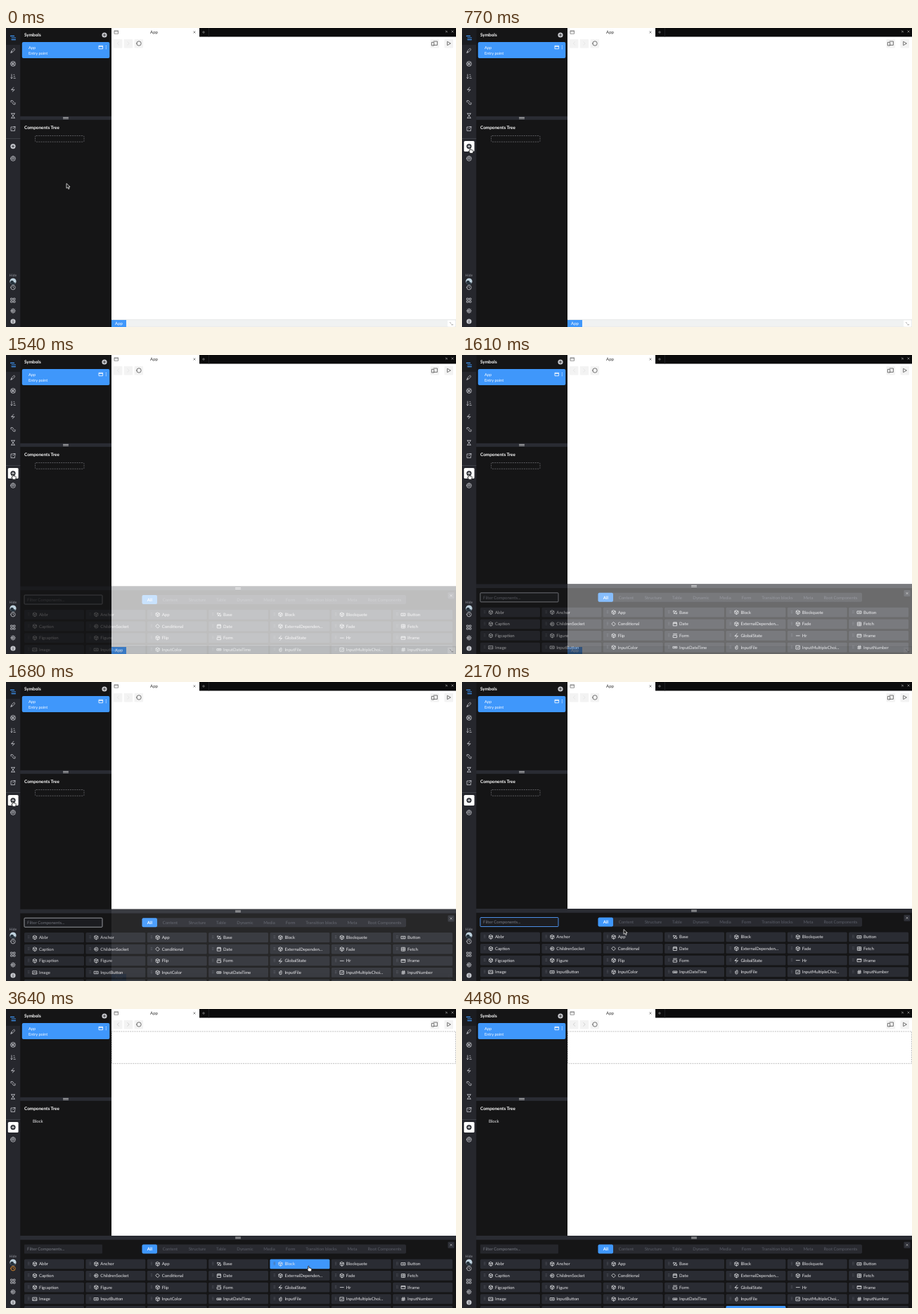
Animation of 640x426 px, one loop 4.55 s. Source, as an HTML page:

```html
<!DOCTYPE html>
<html lang="en">
<head>
<meta charset="utf-8">
<title>Component builder</title>
<style>
  html, body { margin: 0; width: 100%; height: 100%; overflow: hidden; background: #fff; }
  svg { display: block; width: 640px; height: 426px; }
  text { font-family: Lato, sans-serif; font-size: 6.05px; fill: #e9e9ec; text-rendering: geometricPrecision; white-space: pre; }
  .icon { fill: none; stroke: #c4c6cc; stroke-width: .8; stroke-linecap: round; stroke-linejoin: round; }
</style>
</head>
<body>
<svg id="stage" viewBox="0 0 640 426"></svg>
<script>
const LOOP = 4550, STEP = 70;
const BLUE = '#3f97fb', PANEL = '#151516', BAR = '#2a2c33';
const stage = document.getElementById('stage');

function add(parent, tag, attrs = {}, content = '') {
  const el = document.createElementNS('http://www.w3.org/2000/svg', tag);
  for (const key in attrs) el.setAttribute(key, attrs[key]);
  el.textContent = content;
  return parent.appendChild(el);
}
const group = (parent = stage) => add(parent, 'g');
const rect = (parent, x, y, width, height, fill, rx = 0, extra = {}) =>
  add(parent, 'rect', { x, y, width, height, fill, rx, ...extra });
const label = (parent, x, y, content, extra = {}) => add(parent, 'text', { x, y, ...extra }, content);
const icon = (parent, x, y, d, extra = {}) =>
  add(parent, 'path', { class: 'icon', d, transform: `translate(${x} ${y})`, ...extra });
const tint = (color, more = '') => ({ style: `stroke:${color};${more}` });
const show = (el, on) => el.setAttribute('visibility', on ? 'visible' : 'hidden');
const circle = r => `M${-r} 0a${r} ${r} 0 1 1 ${2 * r} 0a${r} ${r} 0 1 1 ${-2 * r} 0z`;

const PLUS = 'M-1.6 0h3.2M0-1.6v3.2';
const CROSS = 'M-1.2-1.2l2.4 2.4M1.2-1.2l-2.4 2.4';
const WINDOW = 'M-2.6-2.2h5.2v4.4h-5.2zM-2.6-1h5.2';
const BOLT = 'M.8-3l-3 3.4h4.4l-3 2.8M-2.2.4l1.8-.1';
const SHAPES = {
  cube: 'M0-2.8l2.5 1.3v2.9L0 2.8l-2.5-1.4v-2.9zM-2.5-1.5L0-.2l2.5-1.3M0-.2v3',
  socket: circle(2.6) + circle(.9),
  diamond: 'M0-2.7L2.7 0 0 2.7-2.7 0z',
  swap: 'M-2.4-.3v-2l4 1.4M2.4.3v2l-4-1.4M-1.5 2l3-4',
  button: 'M-2.8-1.7h5.6v3.4h-5.6zM-1 0h2',
  date: 'M-2.4-2.1h4.8v4.6h-4.8zM-2.4-.7h4.8M-1.2-2.9v1M1.2-2.9v1',
  grid: 'M-2.4-2.4h4.8v4.8h-4.8zM-2.4 0h4.8M0-2.4v4.8',
  form: 'M-2.5-2.5h5M-2.5-.6h5v3.1h-5z',
  bolt: BOLT,
  line: 'M-2.5 0h5',
  frame: 'M-2.7-2h5.4v4h-5.4zM-2.7-.9h5.4',
  image: 'M-2.8-2.2h5.6v4.4h-5.6zM-2.8 1.4l2-2 1.3 1.2 1-.8 1.3 1.4',
  field: 'M-2.8-1.2h5.6v2.4h-5.6zM-1.2 0h2.4',
  clip: 'M-1.6-1v2.4a1.6 1.4 0 0 0 3.2 0v-3a1 1 0 0 0-2 0v2.6',
  check: 'M-2.5-2.5h5v5h-5zM-1.2 0l1 1 1.6-2',
  hash: 'M-2.4-1h4.8M-2.4 1h4.8M-.6-2.5l-.8 5M1.4-2.5l-.8 5'
};

// Page area
const page = group();
rect(page, 150, 0, 490, 12.5, '#0b0b0c');
rect(page, 150, 0, 125, 13, '#fff');
rect(page, 288, 0, .7, 12.5, '#26272b');
icon(page, 157, 6, WINDOW, tint('#777'));
label(page, 210.5, 8, 'App', { 'text-anchor': 'middle', style: 'fill:#333' });
icon(page, 268, 6, CROSS, tint('#777'));
icon(page, 281, 6, PLUS, tint('#888', 'stroke-width:.7'));
icon(page, 626.5, 5, 'M-1.3-1l2.6 2M-.8 1.2l1.4-2', tint('#888'));
icon(page, 635, 5, CROSS, tint('#888'));
for (const x of [153, 167.7, 182.6, 603.5, 623.5]) rect(page, x, 16, 12.5, 12.5, '#f3f3f3', 1);
const arrows = [icon(page, 159.5, 22, 'M1.2-2.4L-1.2 0l2.4 2.4'), icon(page, 174, 22, 'M-1.2-2.4L1.2 0l-2.4 2.4')];
icon(page, 189, 22, circle(3.2), tint('#555'));
icon(page, 609.7, 22, 'M-4-1.6h3v4.6h-3zM-1.5-3h5.2v5.4h-5.2', tint('#555'));
icon(page, 630, 22, 'M-2-2.5L2.4 0-2 2.5z', tint('#555'));
rect(page, 150, 415.5, 490, 10.5, '#f0f2f2', 0, { stroke: '#dcdede', 'stroke-width': .5 });
rect(page, 150, 416, 21, 10, BLUE);
label(page, 160.5, 423.3, 'App', { 'text-anchor': 'middle', style: 'fill:#fff' });
rect(page, 628, 416.5, 11, 9, '#fff', 1);
icon(page, 633.5, 421, 'M-2-1.5L-.6 0M.2 1.8h2', tint('#777', 'stroke-width:.7'));
const dashed = { 'stroke-width': .7, 'stroke-dasharray': '2 1.2' };
const pageBlock = rect(page, 150.5, 32, 489, 45.7, 'none', 0, { stroke: '#a4a4a4', ...dashed });

// Symbols and tree column
const column = group();
const heading = { style: 'font-weight:700;font-size:6.4px;fill:#fff' };
rect(column, 20, 0, 130, 426, PANEL);
label(column, 26, 12.1, 'Symbols', heading);
add(column, 'circle', { cx: 140, cy: 10, r: 3.6, fill: '#c9cacf' });
icon(column, 140, 10, PLUS, tint('#222'));
rect(column, 22.8, 20, 124.5, 23, BLUE, 2);
label(column, 32, 30, 'App', { style: 'font-size:5.6px;fill:#fff' });
label(column, 32, 38.4, 'Entry point', { style: 'font-size:5.6px;fill:#fff' });
icon(column, 135, 27.5, WINDOW, tint('#fff'));
icon(column, 142.3, 27.5, 'M0-2v0M0 0v0M0 2v0', tint('#fff', 'stroke-width:1.2'));
rect(column, 20, 125.8, 130, 5, BAR);
icon(column, 85, 128.3, 'M-3.5-.9h7M-3.5.9h7', tint('#ddd'));
label(column, 26, 144.4, 'Components Tree', heading);
const dropBox = rect(column, 41.5, 153.5, 69.5, 8.7, 'none', 1.5, { stroke: '#77787c', ...dashed });
const treeBlock = label(column, 38, 162.2, 'Block');

// Components panel
const panel = group();
rect(panel, 20, 323, 620, 120, PANEL);
rect(panel, 20, 323, 620, 5.8, BAR);
icon(panel, 330, 326, 'M-3.5-.9h7M-3.5.9h7', tint('#ddd'));
rect(panel, 628.5, 331.7, 9, 9, '#2f3138', 1);
icon(panel, 633, 336.2, CROSS, tint('#bbb', 'stroke-width:.7'));
const filter = rect(panel, 26, 335.5, 111, 13, '#25262b', 1);
label(panel, 30, 344.2, 'Filter Components...', { style: 'fill:#777a83' });
rect(panel, 193.5, 335.5, 375.5, 13, '#292a30', 2);
rect(panel, 193.5, 335.5, 21.5, 13, BLUE, 2);
const tabs = { All: 204.3, Content: 233.5, Structure: 272, Table: 306, Dynamic: 340, Media: 374.5,
  Form: 404.7, 'Transition blocks': 448.5, Meta: 492.5, 'Root Components': 538.5 };
for (const name in tabs) {
  label(panel, tabs[name], 344.2, name,
    { 'text-anchor': 'middle', style: name === 'All' ? 'fill:#fff;font-weight:700' : 'fill:#595c66' });
}

const components = [
  'Abbr Anchor App Base:swap Block Blockquote Button:button',
  'Caption ChildrenSocket:socket Conditional:diamond Date:date ExternalDependen... Fade Fetch:grid',
  'Figcaption Figure Flip Form:form GlobalState:bolt Hr:line Iframe:frame',
  'Image:image InputButton:button InputColor InputDateTime:field InputFile:clip InputMultipleChoi...:check InputNumber:hash',
  '* * * * * * *'
];
const cells = components.flatMap((row, r) => row.split(' ').map((entry, c) => {
  const [name, shape = 'cube'] = entry.split(':');
  const x = 26 + 87.35 * c, y = 356.4 + 16.65 * r, middle = y + 6.9;
  const box = rect(panel, x, y, 85, 13.8, BAR, 1.5);
  if (name !== '*') {
    icon(panel, x + 6.3, middle, 'M-.7-2.4v4.8M.7-2.4v4.8', tint('#5c5f68', 'stroke-dasharray:.1 1.55'));
    icon(panel, x + 15, middle, SHAPES[shape], tint('#e4e5e8'));
    label(panel, x + 21, middle + 2.1, name);
  }
  return { box, x, y };
}));

// Sidebar
const side = group();
rect(side, 0, 0, 20.3, 426, '#26272d');
rect(side, 0, 0, 20.3, 24, '#1b1c20');
rect(side, 0, 157, 20.3, .8, '#44464e');
icon(side, 10, 14, 'M-3.5-2.6h5M-2 0h5.5M-2 2.6h5.5', tint(BLUE, 'stroke-width:1.2'));
const tools = [
  [32, 'M-3 3l.8-2.4L1.4-3 3-1.4-.6 2.2zM-3 3l1.6-1.6'],
  [51, circle(3.5) + circle(1.3) + 'M-2.5-2.5l1.6 1.6M2.5-2.5L.9-.9M-2.5 2.5l1.6-1.6M2.5 2.5L.9.9'],
  [69, 'M-2-3v6l-1.2-1.2M-2 3l1.2-1.2M1-2.6h.8M1 0h1.6M1 2.6h2.4'],
  [87.5, BOLT],
  [106, 'M-3-.4v-2.2h2.4l2 2.8M3 .4v2.4H.6l-2-2.8'],
  [125, 'M-2.5-3.2h5M-2.5 3.2h5M-2-3.2c0 3 4 3.4 4 6.4M2-3.2c0 3-4 3.4-4 6.4'],
  [143.5, 'M-.5-2.5h-2.5v5.5h5.5V.5M.5-3H3v2.5M3-3L-.5.5'],
  [186, circle(3.4) + 'M-2.4-.8h4.8M-1.6 1h3.2M0-3.4v2.2'],
  [388, 'M-3-3h2.2v2.2H-3zM.8-3H3v2.2H.8zM-3 .8h2.2V3H-3zM.8.8H3V3H.8z'],
  [403, circle(2.4) + circle(.9) + 'M0-3.4v1M0 3.4v-1M-3.4 0h1M3.4 0h-1M-2.4-2.4l.6.6M2.4 2.4l-.6-.6M2.4-2.4l-.6.6M-2.4 2.4l.6-.6']
];
for (const [y, d] of tools) icon(side, 10, y, d);
add(side, 'circle', { cx: 10, cy: 418, r: 3.6, fill: '#c4c6cc' });
icon(side, 10, 418, 'M0-1.6v0M0-.2v1.9', tint('#26272d'));
const addButton = rect(side, 2.8, 161, 14.8, 15, '#fff', 1.5);
const addDisc = add(side, 'circle', { cx: 10, cy: 168.6, r: 3.6 });
const addPlus = icon(side, 10, 168.6, PLUS);
label(side, 10, 353.6, 'Hide', { 'text-anchor': 'middle', style: 'font-size:5px;fill:#92949c' });
add(side, 'circle', { cx: 10, cy: 361, r: 4.6, fill: '#bfd2de' });
add(side, 'path', { d: 'M6 363.3q0-4 3-3.6 2 .4 2 2.6l3 .6q-1.500 2.700-4 2.700-2.800 0-4-2.300z', fill: '#26323c' });
const clock = icon(side, 10, 369.7, circle(3.2) + 'M0-1.7V0l1.200.8');

// Pointer
const pointer = group();
const ink = { fill: '#fff', stroke: '#111', 'stroke-width': .8, 'stroke-linejoin': 'round' };
const arrow = add(pointer, 'path', { d: 'M0 0v6.800l1.600-1.400 1.300 2.600 1.200-.6-1.200-2.500 2.200-.1z', ...ink,
  fill: '#111', stroke: '#eee' });
const hand = add(pointer, 'path', { d: 'M-.9.700q.7-1.100 1.400 0v2l3.200.8q.8.300.6 1.500l-.7 2.900h-3.600l-2.400-3q.2-1.200 1.500-.1z', ...ink });
const ring = group();
for (const [stroke, width] of [['#fff', 3.6], ['#0c0c0c', 2]]) {
  add(ring, 'circle', { cx: 428, cy: 367, r: 13, fill: 'none', stroke, 'stroke-width': width });
}

const smooth = u => u * u * (3 - 2 * u);
const speedUp = u => u * u;
const slowDown = u => u * (2 - u);
const clamp = u => Math.min(1, Math.max(0, u));

const track = [
  [70, 86, 221.5], [840, 10, 169.5, smooth], [1890, 10, 169.5, smooth],
  [2170, 230, 352.5, speedUp], [2520, 429, 365.5, slowDown], [3430, 429, 365.5, smooth],
  [3640, 430.5, 366, smooth], [3990, 430.5, 366, smooth], [4410, 434, 430, smooth]
];
function pointerAt(t) {
  const next = track.findIndex(k => k[0] > t);
  if (next < 1) return (next ? track[track.length - 1] : track[0]).slice(1, 3);
  const [t0, x0, y0] = track[next - 1], [t1, x1, y1, ease] = track[next];
  const u = ease((t - t0) / (t1 - t0));
  return [x0 + (x1 - x0) * u, y0 + (y1 - y0) * u];
}

function draw(t) {
  const [x, y] = pointerAt(t);
  const open = smooth(clamp((t - 1440) / 290));
  const added = t >= 3080;

  panel.setAttribute('opacity', open);
  panel.setAttribute('transform', `translate(0 ${9 * (1 - open)})`);
  const focused = t < 3010;
  filter.setAttribute('stroke', !focused ? 'none' : t < 1750 ? '#a0a3aa' : '#4c8fe6');
  filter.setAttribute('fill', focused ? '#1c1d21' : '#25262b');

  let overCell = false;
  for (const cell of cells) {
    const over = open === 1 && x >= cell.x && x <= cell.x + 85 && y >= cell.y && y <= cell.y + 13.8;
    cell.box.setAttribute('fill', over ? BLUE : BAR);
    overCell = overCell || over;
  }

  const overAdd = x < 17.6 && y > 161 && y < 176;
  const active = overAdd || t >= 1330;
  show(addButton, active);
  addDisc.setAttribute('fill', active ? '#33353b' : '#c4c6cc');
  addPlus.style.stroke = active ? '#fff' : '#26272d';
  clock.style.stroke = t >= 3150 && t < 3990 ? '#f0962e' : '#c4c6cc';

  show(dropBox, !added);
  show(treeBlock, added);
  show(pageBlock, added);
  arrows.forEach(a => a.style.stroke = added ? '#c8c8c8' : '#e2e2e2');

  pointer.setAttribute('transform', `translate(${x} ${y})`);
  show(hand, overCell || overAdd);
  show(arrow, !overCell && !overAdd);
  show(ring, t >= 2870 && t < 3080);
}

function tick() {
  draw(Math.floor(performance.now() % LOOP / STEP) * STEP);
  requestAnimationFrame(tick);
}
tick();
</script>
</body>
</html>
```
